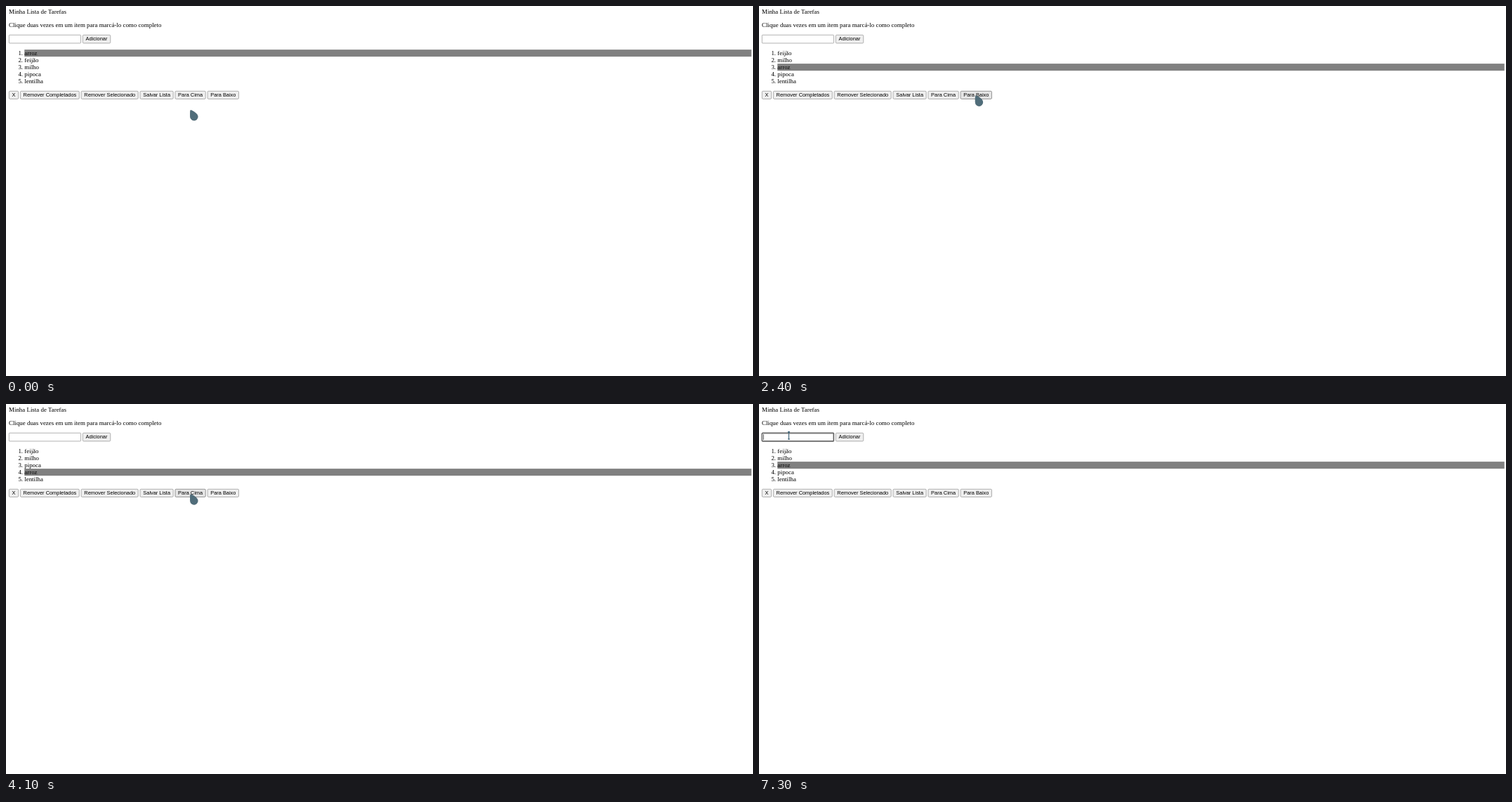
Write an HTML page that moves like this. It is 1064x527 px and loops after 8000 ms.

```html
<!DOCTYPE html>
<html lang="pt-BR">
<head>
<meta charset="utf-8">
<title>Minha Lista de Tarefas</title>
<style>
  html, body { margin: 0; width: 100%; height: 100%; overflow: hidden; background: #fff; }
  #page {
    position: absolute; left: 0; top: 0; width: 1904px; padding: 8px;
    transform: translate(-.4px, -1.2px) scale(.5555); transform-origin: 0 0;
    font: 16px/18px "Liberation Serif", "Times New Roman", serif; color: #000;
  }
  p { margin: 16px 0; }
  ol { margin: 16px 0; padding-left: 40px; }
  .selected { background: #808080; }
  .row { display: flex; gap: 4px; height: 21.5px; }
  .button, #field { box-sizing: border-box; height: 21.5px; border: 1px solid #767676; border-radius: 3px; }
  .button {
    padding: 2px 7px; background: #efefef; white-space: nowrap;
    font: 13.333px/15.5px "Liberation Sans", Arial, sans-serif;
  }
  .hover { background: #e5e5e5; border-color: #4f4f4f; }
  .active { background: #f5f5f5; border-color: #8d8d8d; }
  #field { position: relative; width: 185px; border-radius: 2px; }
  #field.over { border-color: #4f4f4f; }
  #field.focus { border-color: #101010; box-shadow: 0 0 0 .5px #101010, inset 0 0 0 1px #101010; }
  #caret { position: absolute; left: 2.6px; top: 2.5px; width: 1px; height: 14.5px; background: #000; }
  svg { position: absolute; left: 0; top: 0; overflow: visible; }
  #arrow { filter: drop-shadow(0 .4px .5px rgba(0, 0, 0, .4)); }
</style>
</head>
<body>
<div id="page">
  <div>Minha Lista de Tarefas</div>
  <p>Clique duas vezes em um item para marcá-lo como completo</p>
  <div class="row"><div id="field"><div id="caret"></div></div><div class="button">Adicionar</div></div>
  <ol><li></li><li></li><li></li><li></li><li></li></ol>
  <div class="row">
    <div class="button">X</div>
    <div class="button">Remover Completados</div>
    <div class="button">Remover Selecionado</div>
    <div class="button">Salvar Lista</div>
    <div class="button" id="up">Para Cima</div>
    <div class="button" id="down">Para Baixo</div>
  </div>
</div>
<svg id="arrow" width="12" height="16">
  <path fill="#506d7a" d="M1.2 .2C3.5 .6 8.5 3.6 10.4 6.5A5.6 5.6 0 1 1 .2 10C0 6.5 .1 3.5 .4 .9Q.6 .1 1.2 .2Z"/>
</svg>
<svg id="beam" width="3" height="12">
  <path fill="#44687c" d="M0 0H3V1.7H2.1V10.5H3V11.7H0V10.5H.9V1.7H0Z"/>
</svg>
<script>
const LOOP = 8000;
const $ = id => document.getElementById(id);
const items = [...document.querySelectorAll("li")];
const others = ["feijão", "milho", "pipoca", "lentilha"];

// [start ms, pointer x, pointer y]
const pointer = [
  [0, 262, 148], [400, 294.3, 140.3], [700, 303, 131.5], [800, 306, 129], [900, 307.3, 127.8],
  [1000, 307.7, 127.4], [3400, 307.7, 128.4], [3800, 262, 128.2], [5000, 47.7, 52],
  [5400, 34.3, 54], [5800, 41, 39], [6200, 41, 37.3], [6500, 41, 39]
];
// [start ms, position of the selected item]
const moves = [[0, 0], [2200, 1], [2400, 2], [2700, 3], [3400, 4], [4100, 3], [4600, 2]];

const at = (steps, t) => steps.findLast(step => step[0] <= t);
const within = (t, from, to) => t >= from && t < to;

function draw(t) {
  const [, x, y] = at(pointer, t);
  const typing = t >= 5800;
  for (const id of ["arrow", "beam"]) {
    $(id).style.transform = `translate(${x}px, ${y}px)`;
    $(id).style.display = (id === "beam") === typing ? "block" : "none";
  }

  const [, place] = at(moves, t);
  const names = others.toSpliced(place, 0, "arroz");
  items.forEach((item, i) => {
    item.textContent = names[i];
    item.className = i === place ? "selected" : "";
  });

  const pressed = within(t, 2100, 2200) || within(t, 2300, 2400) || within(t, 2500, 2700);
  $("down").classList.toggle("hover", within(t, 700, 3800));
  $("down").classList.toggle("active", pressed);
  $("up").classList.toggle("hover", within(t, 3800, 5000));

  const focused = t >= 6200;
  $("field").classList.toggle("over", typing);
  $("field").classList.toggle("focus", focused);
  $("caret").style.display = focused && !within(t, 6900, 7300) ? "block" : "none";
}

const start = performance.now();
function tick() {
  draw((performance.now() - start) % LOOP);
  requestAnimationFrame(tick);
}
tick();
</script>
</body>
</html>
```
